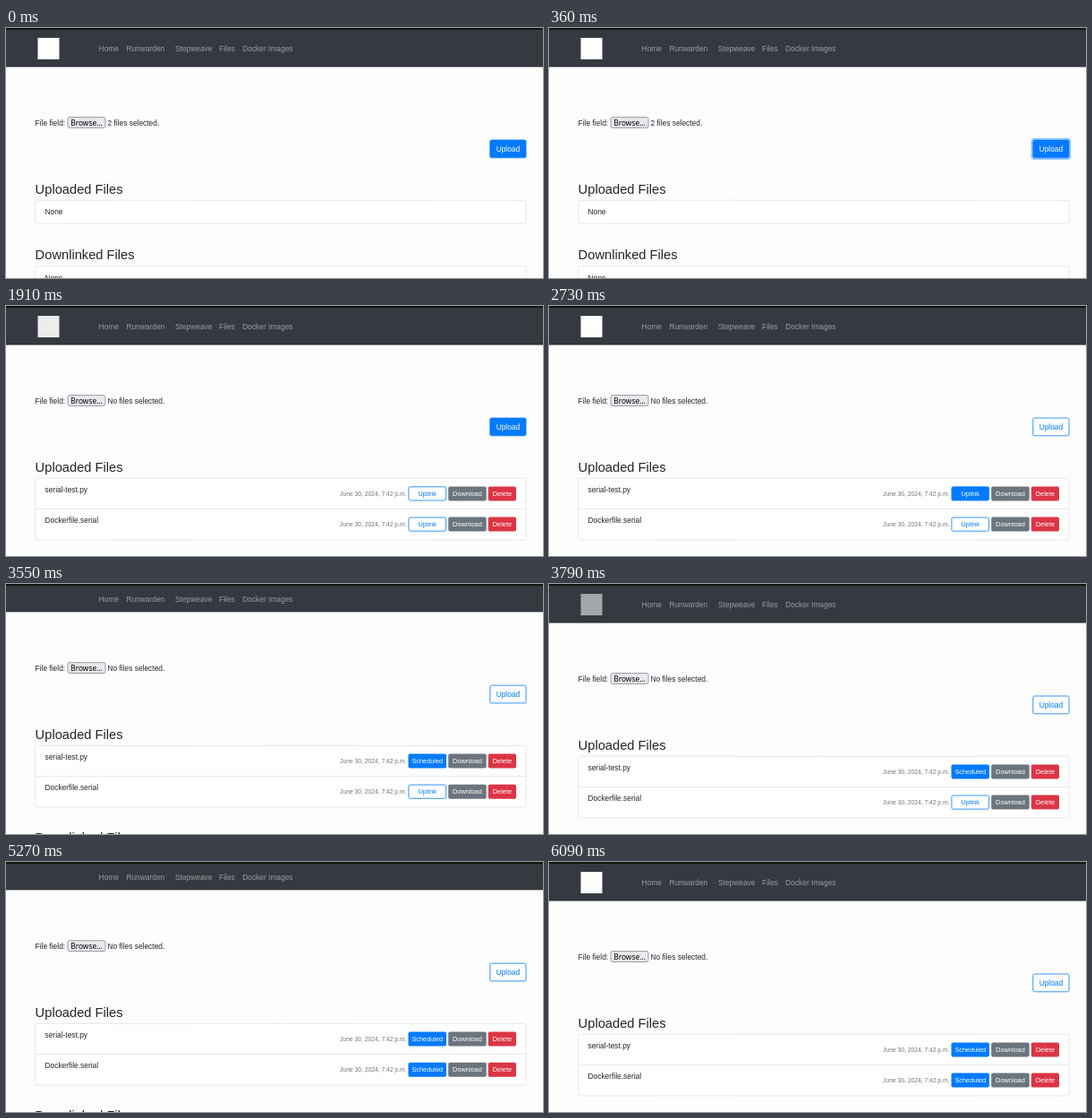
An HTML page with a canvas for the animation above (7000 ms loop, 600 px wide and 279 px high).

```html
<!DOCTYPE html>
<html lang="en">
<head>
<meta charset="utf-8">
<title>File upload</title>
<style>
  html, body { margin: 0; width: 100%; height: 100%; overflow: hidden; background: #fefdfe; }
  canvas { display: block; width: 600px; height: 279px; }
</style>
</head>
<body>
<canvas id="stage"></canvas>
<script>
const W = 600, H = 279, LOOP = 7000;
const SANS = '"Liberation Sans", Arial, sans-serif';
const REM = 8.4;
const INK = '#212529', BLUE = '#007bff', GREY = '#6c757d', RED = '#dc3545';

const canvas = document.getElementById('stage');
const dpr = window.devicePixelRatio || 1;
canvas.width = W * dpr;
canvas.height = H * dpr;
const ctx = canvas.getContext('2d');
ctx.scale(dpr, dpr);

// Page loads: the bar stays low until its logo arrives, then the logo fades in.
const LOADS = [
  { at: 1360, logo: 1550 },
  { at: 3550, logo: 3670 },
  { at: 5180, logo: 5300 }
];

const NAV = [
  ['Home', 103.6], ['Runwarden', 134.4], ['Stepweave', 189],
  ['Files', 238.1], ['Docker Images', 264.2]
];

const ROWS = [
  { name: 'serial-test.py', y: 192.3, hover: 2550, focus: 3210, done: 3550 },
  { name: 'Dockerfile.serial', y: 226.5, hover: 4370, focus: 4640, done: 5180 }
];

function ramp(t, start, dur) {
  const p = Math.min(1, Math.max(0, (t - start) / dur));
  return p * p * (3 - 2 * p);
}

function text(str, x, y, size = REM, color = INK, align = 'left', family = SANS) {
  ctx.font = size + 'px ' + family;
  ctx.textAlign = align;
  ctx.fillStyle = color;
  ctx.fillText(str, x, y);
}

function box(x, y, w, h, r, fill, stroke, line = 0.8) {
  ctx.beginPath();
  ctx.roundRect(x, y, w, h, r);
  if (fill) {
    ctx.fillStyle = fill;
    ctx.fill();
  }
  if (stroke) {
    ctx.lineWidth = line;
    ctx.strokeStyle = stroke;
    ctx.stroke();
  }
}

function solidButton(label, x, y, w, h, size, color) {
  box(x, y, w, h, 1.8, color);
  text(label, x + w / 2, y + h / 2 + size * 0.36, size, '#fff', 'center');
}

// Outlined button; hover fills it, focus adds a soft ring.
function outlineButton(label, x, y, w, h, size, hover, focus) {
  if (focus > 0) {
    box(x - 0.9, y - 0.9, w + 1.8, h + 1.8, 2.8, null, `rgba(0,123,255,${0.5 * focus})`, 1.8);
  }
  box(x + 0.4, y + 0.4, w - 0.8, h - 0.8, 1.8, `rgba(0,123,255,${hover})`, BLUE);
  const mix = (a) => Math.round(a + (255 - a) * hover);
  text(label, x + w / 2, y + h / 2 + size * 0.36, size, `rgb(${mix(0)},${mix(123)},255)`, 'center');
}

function drawBar(low, logoAlpha) {
  const bottom = low ? 31.3 : 43.3;
  ctx.fillStyle = '#343a40';
  ctx.fillRect(0, 0, W, bottom);
  ctx.fillStyle = '#14130f';
  ctx.fillRect(0, 0, W, 2);
  if (!low) {
    ctx.fillStyle = '#25292d';
    ctx.fillRect(0, 42.5, W, 0.8);
    ctx.fillStyle = `rgba(255,255,255,${logoAlpha})`;
    ctx.fillRect(35.5, 11, 24, 24);
  }
  for (const [label, x] of NAV) {
    text(label, x, low ? 20 : 26, REM, 'rgba(255,255,255,0.5)');
  }
}

function drawForm(t, uploaded) {
  text('File field:', 32.6, 108.8);
  box(69, 99.6, 42, 11.8, 2, '#e9e9ed', '#8f8f9d', 0.9);
  text('Browse…', 90, 108.8, REM, '#000', 'center', '"Noto Sans", "Open Sans", sans-serif');
  text(uploaded ? 'No files selected.' : '2 files selected.', 113.5, 108.8);

  const hover = uploaded ? ramp(t, 1540, 150) - ramp(t, 2240, 150) : 1;
  const focus = uploaded ? 0 : ramp(t, 260, 130);
  outlineButton('Upload', 540.4, 124.6, 41, 20.6, REM, hover, focus);
}

function drawList(y, h) {
  box(32.8, y, 548.4, h, 2.1, '#fff', '#dfdfdf', 0.7);
}

function drawRow(row, t) {
  const y = row.y + 9.1, h = 16, size = 7.35;
  text(row.name, 43.5, row.y + 15.2);
  text('June 30, 2024, 7:42 p.m.', 447.4, row.y + 19.5, 6.72, GREY, 'right');
  if (t >= row.done) {
    solidButton('Scheduled', 449.5, y, 42.5, h, size, BLUE);
  } else {
    outlineButton('Uplink', 449.5, y, 42.5, h, size,
      ramp(t, row.hover - 20, 150), ramp(t, row.focus, 150));
  }
  solidButton('Download', 494.2, y, 42.5, h, size, GREY);
  solidButton('Delete', 538.8, y, 31.2, h, size, RED);
}

function draw(t) {
  const load = LOADS.filter((l) => t >= l.at).pop();
  const low = !!load && t < load.logo;
  const logoAlpha = load ? 1 - Math.exp(-(t - load.logo) / 150) : 1;
  const uploaded = !!load;

  ctx.fillStyle = '#fefdfe';
  ctx.fillRect(0, 0, W, H);
  drawBar(low, logoAlpha);

  ctx.save();
  ctx.translate(0, low ? -11.9 : 0);
  drawForm(t, uploaded);
  text('Uploaded Files', 32.6, 184.6, 14.7);
  if (uploaded) {
    drawList(192.3, 68.6);
    ctx.fillStyle = '#dfdfdf';
    ctx.fillRect(33, 226.2, 548, 0.7);
    ROWS.forEach((row) => drawRow(row, t));
    text('Downlinked Files', 32.6, 299.6, 14.7);
  } else {
    drawList(192.3, 26);
    text('None', 43.5, 208.1);
    text('Downlinked Files', 32.6, 258.2, 14.7);
    drawList(265.8, 26);
    text('None', 43.5, 281.8);
  }
  ctx.restore();
}

const start = performance.now();
function tick() {
  draw((performance.now() - start) % LOOP);
  requestAnimationFrame(tick);
}
tick();
</script>
</body>
</html>
```
